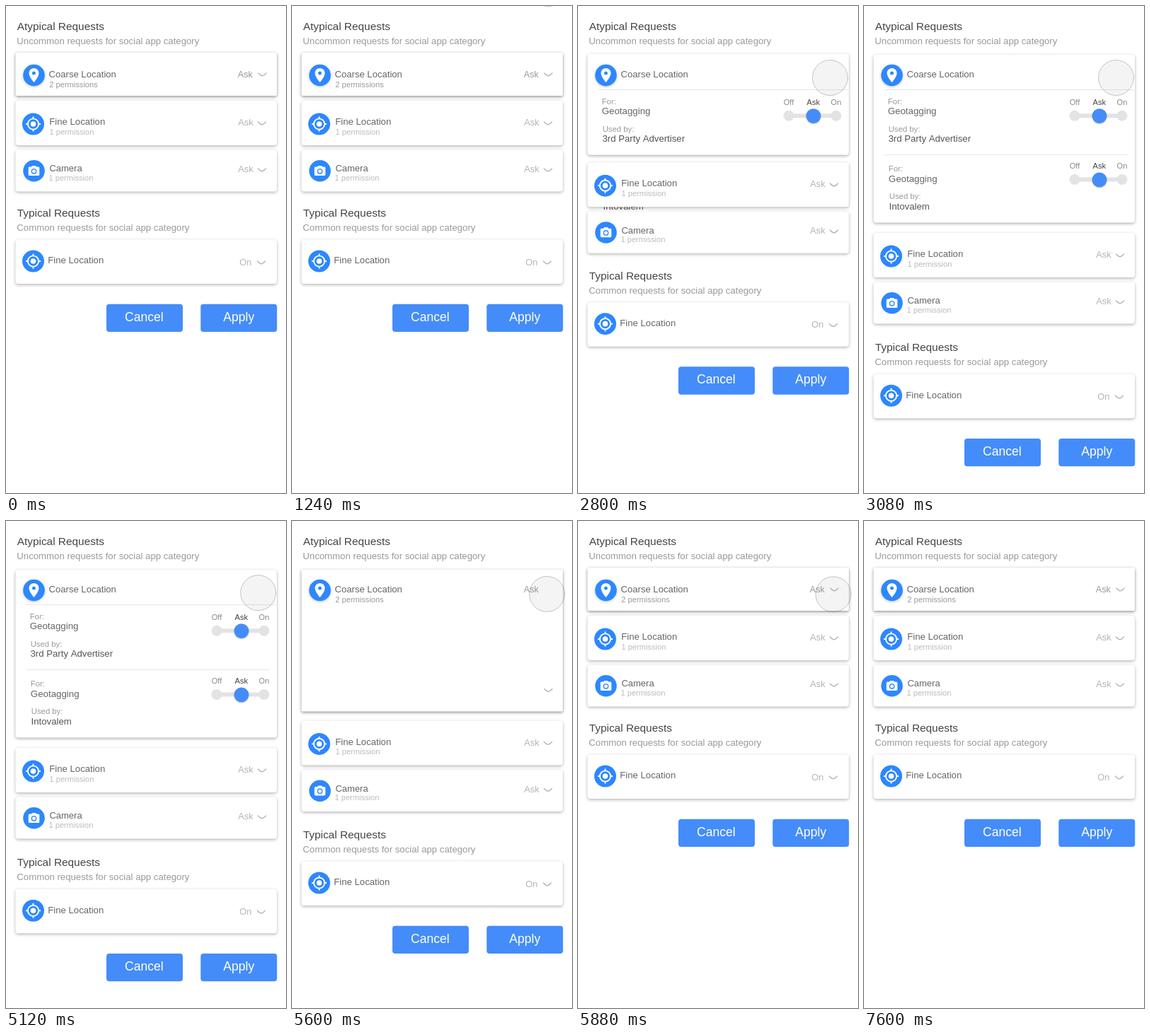
An HTML page with a canvas for the animation above (8.24 s loop, 396 by 689 pixels).

```html
<!DOCTYPE html>
<html lang="en">
<head>
<meta charset="utf-8">
<title>Permission requests</title>
<style>
  html, body { margin: 0; width: 100%; height: 100%; overflow: hidden; background: #fff; }
  canvas { display: block; width: 396px; height: 689px; }
</style>
</head>
<body>
<canvas id="stage"></canvas>
<script>
const W = 396, H = 689, LOOP = 8240, STEP = 40;
const BLUE = '#448cfa', ICON_BLUE = '#2d87ff';
const OPEN = 2717, CLOSE = 5552, SLIDE = 300;

const canvas = document.getElementById('stage');
const ctx = canvas.getContext('2d');
const dpr = window.devicePixelRatio || 1;
canvas.width = W * dpr;
canvas.height = H * dpr;

const PIN = new Path2D('M12 2C8.13 2 5 5.13 5 9c0 5.25 7 13 7 13s7-7.75 7-13c0-3.87-3.13-7-7-7z' +
  'M12 11.5a2.5 2.5 0 1 1 0-5 2.5 2.5 0 0 1 0 5z');
const CAMERA = new Path2D('M9 2L7.2 4H4a2 2 0 0 0-2 2v12a2 2 0 0 0 2 2h16a2 2 0 0 0 2-2V6' +
  'a2 2 0 0 0-2-2h-3.2L15 2zM12 17a5 5 0 1 1 0-10 5 5 0 0 1 0 10z');

// Touch moves: start, end, target x, target y
const TOUCH_START = [363, -30];
const TOUCH = [
  [1170, 1720, 360.5, 95.5],
  [1930, 2040, 355.5, 101.5],
  [2450, 2560, 356.5, 101.5],
  [5090, 5280, 360.5, 103.2],
  [5540, 5700, 361.2, 103.7],
  [7010, 7600, 372, -30]
];

const clamp = v => Math.max(0, Math.min(1, v));
const mix = (a, b, p) => a + (b - a) * p;
const smooth = v => v * v * (3 - 2 * v);

function ease(x) {
  if (x <= 0 || x >= 1) return clamp(x);
  const bezier = (a, b, u) => 3 * a * u * (1 - u) ** 2 + 3 * b * u * u * (1 - u) + u ** 3;
  let lo = 0, hi = 1;
  for (let i = 0; i < 24; i++) {
    const mid = (lo + hi) / 2;
    if (bezier(0.25, 0.25, mid) < x) lo = mid; else hi = mid;
  }
  return bezier(0.1, 1, lo);
}

function text(str, x, y, size, color) {
  ctx.font = size + 'px "Liberation Sans", Arial, sans-serif';
  ctx.fillStyle = color;
  ctx.fillText(str, x, y);
}

function disc(x, y, r, color) {
  ctx.beginPath();
  ctx.arc(x, y, r, 0, Math.PI * 2);
  ctx.fillStyle = color;
  ctx.fill();
}

function box(x, y, w, h, r, color) {
  ctx.beginPath();
  ctx.roundRect(x, y, w, h, r);
  ctx.fillStyle = color;
  ctx.fill();
}

function shadow(alpha, dy, blur) {
  ctx.shadowColor = `rgba(0,0,0,${alpha})`;
  ctx.shadowOffsetY = dy * dpr;
  ctx.shadowBlur = blur * dpr;
}

function shadowed(alpha, dy, blur, draw) {
  ctx.save();
  shadow(alpha, dy, blur);
  draw();
  ctx.restore();
}

function card(top, bottom, alpha = 0.3, r = 4) {
  shadowed(alpha, 1.5, 4, () => box(13.5, top, 369.5, bottom - top, r, '#fff'));
}

function chevron(x, y) {
  ctx.beginPath();
  ctx.moveTo(x - 5.5, y - 2);
  ctx.quadraticCurveTo(x - 2, y + 1.7, x, y + 1.7);
  ctx.quadraticCurveTo(x + 2, y + 1.7, x + 5.5, y - 2);
  ctx.lineWidth = 1.5;
  ctx.lineCap = 'round';
  ctx.strokeStyle = '#b8b8b8';
  ctx.stroke();
}

function glyph(path, x, y, scale, midY) {
  ctx.save();
  ctx.translate(x, y);
  ctx.scale(scale, scale);
  ctx.translate(-12, -midY);
  ctx.fillStyle = '#fff';
  ctx.fill(path);
  ctx.restore();
}

function target(x, y) {
  disc(x, y, 15.5, ICON_BLUE);
  disc(x, y, 3.8, '#fff');
  ctx.beginPath();
  ctx.arc(x, y, 7.6, 0, Math.PI * 2);
  for (const [dx, dy] of [[1, 0], [0, 1], [-1, 0], [0, -1]]) {
    ctx.moveTo(x + dx * 7.6, y + dy * 7.6);
    ctx.lineTo(x + dx * 10.5, y + dy * 10.5);
  }
  ctx.lineWidth = 1.9;
  ctx.lineCap = 'butt';
  ctx.strokeStyle = '#fff';
  ctx.stroke();
}

function heading(title, sub, y) {
  text(title, 15.7, y, 15.4, '#444');
  text(sub, 15.3, y + 20, 13.2, '#999');
}

function divider(y, right) {
  ctx.fillStyle = '#e6e6e6';
  ctx.fillRect(28, y, right - 28, 1);
}

function slider(y) {
  text('Off', 290.7, y - 15.5, 11.1, '#888');
  text('Ask', 323.5, y - 15.5, 11.1, '#444');
  text('On', 357.6, y - 15.5, 11.1, '#888');
  ctx.fillStyle = '#e3e3e3';
  ctx.fillRect(298, y - 3, 67, 6);
  disc(298, y, 7.5, '#e3e3e3');
  disc(365, y, 7.5, '#e3e3e3');
  shadowed(0.25, 1, 2, () => disc(333, y + 0.3, 10.4, BLUE));
}

function detail(x, y, user) {
  text('For:', x, y, 11.3, '#999');
  text('Geotagging', x, y + 14.3, 13.3, '#666');
  text('Used by:', x + 1, y + 39, 11.3, '#999');
  text(user, x + 0.8, y + 53.5, 13.2, '#555');
}

function coarseCard(p, expanded) {
  const bottom = mix(127, 306.5, p);
  card(mix(66, 69, p), bottom, expanded ? 0.33 : 0.45, expanded ? 4 : 2);
  shadowed(0.22, 1, 4, () => disc(39.5, 98, 15.3, ICON_BLUE));
  glyph(PIN, 39.5, 98, 1, 12);
  text('Coarse Location', 60.5, 101.3, 13.1, '#666');
  if (expanded) {
    divider(118, 382);
    detail(33.7, 138.5, '3rd Party Advertiser');
    slider(155.3);
    divider(210, 373);
    detail(34.8, 234.3, 'Intovalem');
    slider(245.5);
  } else {
    text('2 permissions', 61.3, 115, 11.1, '#999');
    text('Ask', 327.8, 101.3, 12.6, '#999');
    chevron(362.5, bottom - 30);
  }
}

function listCards(dy) {
  ctx.save();
  ctx.translate(0, dy);
  card(134, 197);
  target(38.5, 167);
  text('Fine Location', 61.3, 168.3, 13.15, '#666');
  text('1 permission', 61.5, 181.5, 11.1, '#bbb');
  text('Ask', 328.3, 169.3, 12.8, '#b4b4b4');
  chevron(362, 166);

  card(203.5, 262.5);
  disc(39.5, 233.3, 15.3, ICON_BLUE);
  glyph(CAMERA, 39.5, 233, 0.78, 11);
  disc(39.5, 233.8, 2.5, '#fff');
  text('Camera', 61.4, 234.4, 13, '#666');
  text('1 permission', 60.5, 246.7, 11.1, '#bbb');
  text('Ask', 328.3, 235.3, 12.8, '#b4b4b4');
  chevron(362, 232);
  ctx.restore();
}

function button(label, x, labelX) {
  box(x, 421.7, 108, 39.3, 4, BLUE);
  text(label, labelX, 445.7, 17.6, '#fff');
}

function lowerPart(dy) {
  ctx.save();
  ctx.translate(0, dy);
  heading('Typical Requests', 'Common requests for social app category', 298);
  card(330.5, 393);
  target(38.5, 361);
  text('Fine Location', 59.3, 364.2, 13.15, '#666');
  text('On', 330.3, 366.5, 12.8, '#b4b4b4');
  chevron(361, 363);
  button('Cancel', 142, 168);
  button('Apply', 275.3, 307.3);
  ctx.restore();
}

function touch(t) {
  let [x, y] = TOUCH_START;
  for (const [from, to, nx, ny] of TOUCH) {
    const p = smooth(clamp((t - from) / (to - from)));
    x = mix(x, nx, p);
    y = mix(y, ny, p);
  }
  disc(x, y, 25, 'rgba(120,120,120,0.08)');
  ctx.lineWidth = 1;
  ctx.strokeStyle = 'rgba(120,120,120,0.42)';
  ctx.stroke();
}

function draw(t) {
  const p = ease((t - OPEN) / SLIDE) - ease((t - CLOSE) / SLIDE);
  ctx.setTransform(dpr, 0, 0, dpr, 0, 0);
  ctx.fillStyle = '#fff';
  ctx.fillRect(0, 0, W, H);
  heading('Atypical Requests', 'Uncommon requests for social app category', 34);
  coarseCard(p, t >= OPEN && t < CLOSE);
  listCards(187 * p);
  lowerPart(190.3 * p);
  touch(t);
}

const start = performance.now();
function tick() {
  const t = (performance.now() - start) % LOOP;
  draw(Math.floor(t / STEP) * STEP);
  requestAnimationFrame(tick);
}
tick();
</script>
</body>
</html>
```
